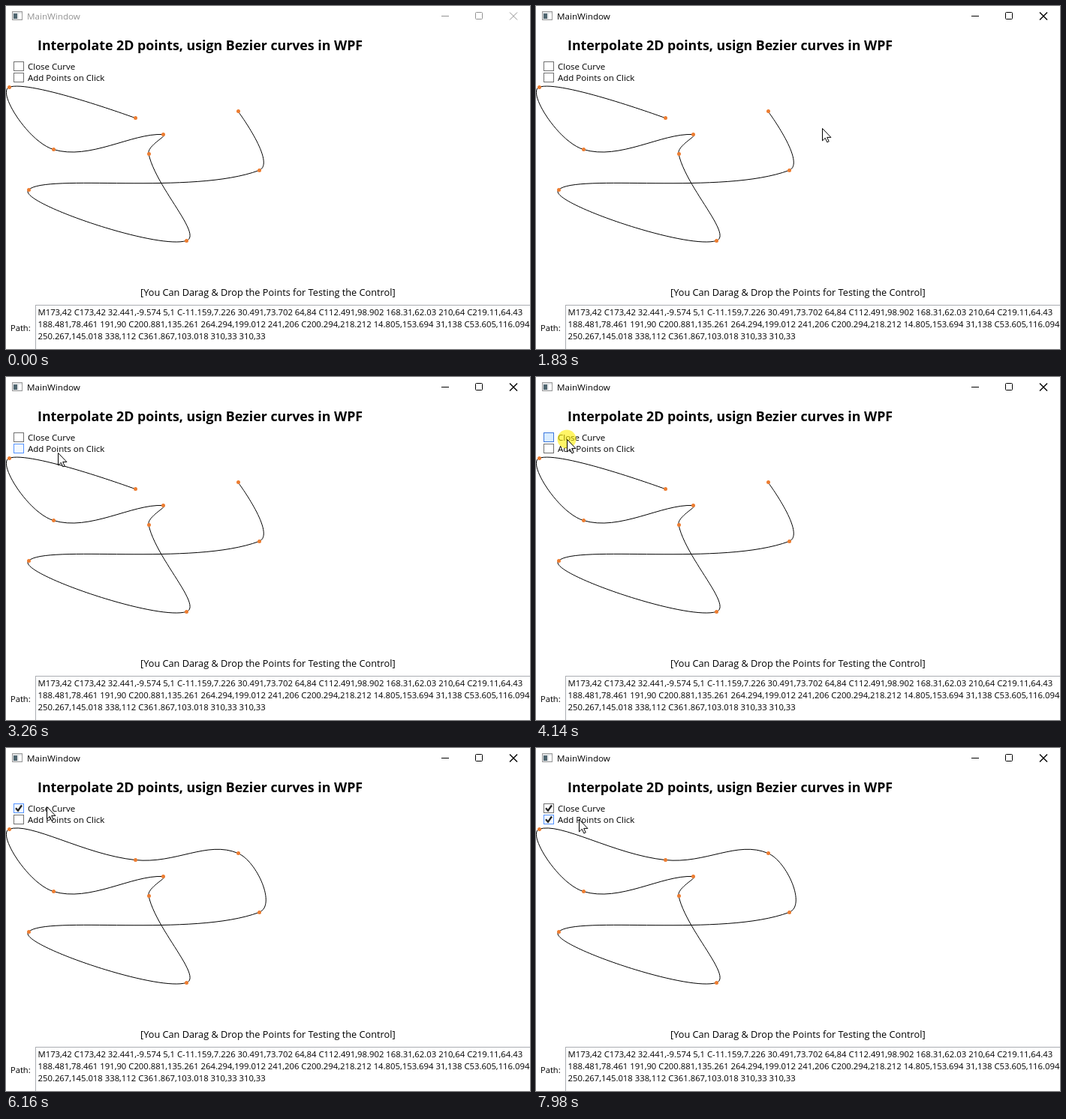
Write an HTML page that moves like this. It is 698x458 px and loops after 8 s.

```html
<!DOCTYPE html>
<html lang="en">
<head>
<meta charset="utf-8">
<title>MainWindow</title>
<style>
  html, body { margin: 0; width: 100%; height: 100%; overflow: hidden; background: #fff; }
  svg { display: block; width: 698px; height: 458px; }
  text { font-family: "Open Sans", "Noto Sans", sans-serif; font-size: 11.5px; white-space: pre; }
  .line { fill: none; stroke: #000; }
  .path text { font-size: 11.3px; }
  #caption { --ink: #000; --cross: 1.4; }
  #caption.inactive { --ink: #929292; --cross: 1; }
  #caption text { fill: var(--ink); font-size: 11.65px; }
  #caption .line { stroke: var(--ink); }
  #caption .cross { stroke-width: var(--cross); }
  .box { fill: #fff; stroke: #707070; }
  .box.hover { fill: #f3f9ff; stroke: #5593ff; }
  .box.pressed { fill: #d9ecff; stroke: #3c77dd; }
  .tick { fill: none; stroke: #212121; stroke-width: 2.2; }
</style>
</head>
<body>
<svg viewBox="0 0 698 458">
  <g id="caption">
    <rect x="8.5" y="7.5" width="13" height="11" fill="#e4e6e8" stroke="#9a9a9a"/>
    <rect x="10" y="10" width="5" height="7" fill="#4f6670"/>
    <rect x="17" y="10" width="4" height="7" fill="#fff"/>
    <text x="28" y="18">MainWindow</text>
    <path class="line" d="M580 13.5h10"/>
    <rect class="line" x="625.5" y="8.5" width="9" height="9" rx="1"/>
    <path class="line cross" d="M671 8.5l10 10m0-10l-10 10"/>
  </g>

  <text x="42" y="59" style="font-size:17.77px;font-weight:700">Interpolate 2D points, usign Bezier curves in WPF</text>

  <g id="close">
    <rect class="box" x="10.5" y="74.5" width="13" height="12"/>
    <path class="tick" d="M13 80.3l3 3.4 5-7.2"/>
    <text x="29" y="85">Close Curve</text>
  </g>
  <g id="add">
    <rect class="box" x="10.5" y="89.5" width="13" height="12"/>
    <path class="tick" d="M13 95.3l3 3.4 5-7.2"/>
    <text x="29" y="100">Add Points on Click</text>
  </g>

  <path id="curve" class="line" transform="translate(-1 107.5)"/>
  <g id="dots" transform="translate(-.5 107.5)" fill="#ed7d31"></g>

  <text x="179" y="387" style="font-size:12.74px">[You Can Darag &amp; Drop the Points for Testing the Control]</text>

  <g class="path">
    <text x="6" y="434" style="font-size:11.15px">Path:</text>
    <rect id="field" x="39.5" y="399.5" width="670" height="70" fill="#fff" stroke="#abadb3"/>
    <text x="42.5" y="413"></text>
    <text x="42.5" y="429"></text>
    <text x="42.5" y="445"></text>
  </g>

  <g id="cursor">
    <circle id="halo" r="12.5" fill="#ffee00" opacity=".6"/>
    <path d="M.5.5v16.4l3.8-3.6 2.5 5.6 2.4-1.1-2.5-5.4h5.2z" fill="#fff" stroke="#000"/>
  </g>
</svg>

<script>
const LOOP = 8000, STEP = 70;
const $ = id => document.getElementById(id);

const lines = [
  'M173,42 C173,42 32.441,-9.574 5,1 C-11.159,7.226 30.491,73.702 64,84 C112.491,98.902 168.31,62.03 210,64 C219.11,64.43',
  '188.481,78.461 191,90 C200.881,135.261 264.294,199.012 241,206 C200.294,218.212 14.805,153.694 31,138 C53.605,116.094',
  '250.267,145.018 338,112 C361.867,103.018 310,33 310,33'
];
const openPath = lines.join(' ');
const closedPath = openPath
  .replace('C173,42', 'C105,34.865')
  .replace('310,33 310,33', '335.02,43.61 310,33 C269.02,15.61 227,47.665 173,42');

document.querySelectorAll('.path rect ~ text').forEach((el, i) => el.textContent = lines[i]);

// Every third coordinate pair is a curve point; the others are handles.
openPath.match(/[-\d.]+,[-\d.]+/g).filter((_, i) => i % 3 === 0).forEach(pair => {
  const dot = document.createElementNS('http://www.w3.org/2000/svg', 'circle');
  const [x, y] = pair.split(',');
  dot.setAttribute('cx', x);
  dot.setAttribute('cy', y);
  dot.setAttribute('r', 2.5);
  $('dots').append(dot);
});

// Pointer stops: time, x, y
const stops = [
  [180, 697, 456], [1010, 384, 171], [1300, 381, 164], [1760, 381, 164],
  [1830, 381, 163], [1900, 381, 163], [2040, 386, 160], [2560, 386, 160],
  [3260, 69, 101], [3320, 69, 101], [3390, 53, 97], [3600, 41, 85],
  [3730, 41, 85], [3870, 41, 83], [4200, 41, 83], [4700, 46, 85],
  [5270, 46, 85], [5340, 48, 87], [5410, 54, 78], [7100, 54, 78],
  [7310, 56, 94], [7910, 56, 94], [7980, 57, 95], [LOOP, 57, 95]
];
// Clicks: press, release, toggled check box
const clicks = [
  [1150, 1230], [2040, 2170], [4070, 4200, 'close'], [5480, 5630, 'close'],
  [6010, 6150, 'close'], [6430, 6500, 'close'], [7030, 7100, 'close'], [7510, 7650, 'add']
];

function pointerAt(t) {
  const i = Math.max(1, stops.findIndex(s => s[0] > t));
  const [t0, x0, y0] = stops[i - 1], [t1, x1, y1] = stops[i];
  const held = Math.floor(Math.max(0, t - t0) / STEP) * STEP;
  const u = held / (t1 - t0), e = u * u * (3 - 2 * u);
  return [Math.round(x0 + (x1 - x0) * e), Math.round(y0 + (y1 - y0) * e)];
}

function drawCheckBox(id, t, hover, down) {
  const box = $(id).querySelector('.box');
  const checked = clicks.filter(c => c[2] === id && t >= c[1]).length % 2 === 1;
  box.setAttribute('class', 'box' + (hover ? down ? ' pressed' : ' hover' : ''));
  $(id).querySelector('.tick').style.display = checked ? '' : 'none';
  return checked;
}

function draw(t) {
  const [x, y] = pointerAt(t);
  const visible = t >= 250;
  const down = clicks.some(c => t >= c[0] && t < c[1]);

  $('cursor').setAttribute('transform', `translate(${x} ${y})`);
  $('cursor').style.display = visible ? '' : 'none';
  $('halo').style.display = down ? '' : 'none';
  $('caption').setAttribute('class', t < 1150 ? 'inactive' : '');
  $('field').setAttribute('stroke', visible && y >= 400 ? '#7eb4ea' : '#abadb3');

  const closed = drawCheckBox('close', t, x < 92 && y >= 73 && y < 87, down);
  drawCheckBox('add', t, x < 132 && y >= 87 && y < 103, down);
  $('curve').setAttribute('d', closed ? closedPath : openPath);
}

const start = performance.now();
function tick() {
  draw((performance.now() - start) % LOOP);
  requestAnimationFrame(tick);
}
tick();
</script>
</body>
</html>
```
